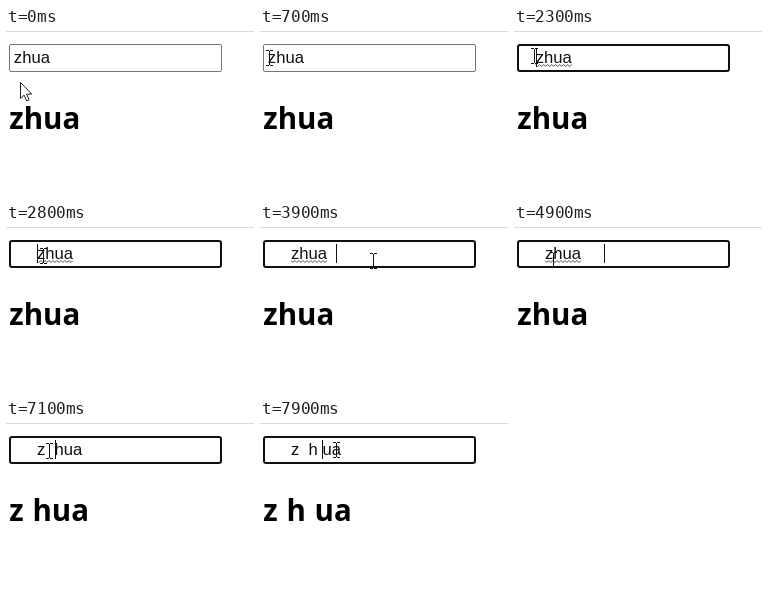
These frames come from a looping animation (248 by 168 pixels, 8 s). An HTML page with a canvas:

```html
<!DOCTYPE html>
<html lang="en">
<head>
<meta charset="utf-8">
<title>Text field</title>
<style>
  html, body { margin: 0; width: 100%; height: 100%; overflow: hidden; background: #fff; }
  canvas { display: block; width: 248px; height: 168px; }
</style>
</head>
<body>
<canvas id="stage"></canvas>
<script>
const W = 248, H = 168, LOOP = 8000, STEP = 100;
const WORD = 'zhua';
const FIELD_FONT = '16.67px "Liberation Sans", Arial, sans-serif';
const TITLE_FONT = '700 29.5px "Open Sans", "Noto Sans", sans-serif';
const TEXT_X = 7.8, BASE_Y = 35;
const FOCUS_AT = 900, MOVE = 500;

// each burst: click behind some letters, then type spaces at a steady pace
const bursts = [
  { click: FOCUS_AT, after: '', from: 1800, gap: 175, count: 5 },
  { click: 3500, after: WORD, from: 3700, gap: 200, count: 5 },
  { click: 6100, after: WORD[0], from: 6500, gap: 300, count: 2 },
  { click: 7300, after: WORD[1], from: 7900, gap: 0, count: 1 }
];

// places where the pointer comes to rest
const stops = [
  { at: 0, x: 14.5, y: 54.5 },
  { at: 700, x: 9, y: 30 },
  { at: 1500, x: 18, y: 28 },
  { at: 2700, x: 37, y: 32 },
  { at: 3400, x: 113, y: 37 },
  { at: 4900, x: 39, y: 36 },
  { at: 5900, x: 43, y: 31 },
  { at: 7700, x: 76, y: 30 }
];

const canvas = document.getElementById('stage');
const ctx = canvas.getContext('2d');
const dpr = window.devicePixelRatio || 1;
canvas.width = W * dpr;
canvas.height = H * dpr;

function fieldState(t) {
  let text = WORD, caret = 0, last = 0;
  for (const { click, after, from, gap, count } of bursts) {
    if (t < click) break;
    caret = text.indexOf(after) + after.length;
    last = click;
    for (let i = 0; i < count && t >= from + i * gap; i++) {
      text = text.slice(0, caret) + ' ' + text.slice(caret);
      caret++;
      last = from + i * gap;
    }
  }
  return { text, caret, focused: t >= FOCUS_AT, lit: (t - last) % 1000 < 500 };
}

function pointerAt(t) {
  let { x, y } = stops[0];
  for (const stop of stops.slice(1)) {
    const p = Math.min(1, Math.max(0, 1 - (stop.at - t) / MOVE));
    const e = p * p * (3 - 2 * p);
    x += (stop.x - x) * e;
    y += (stop.y - y) * e;
  }
  return { x, y };
}

function drawBox(focused) {
  const line = focused ? 2 : 1;
  ctx.beginPath();
  ctx.roundRect(3 + line / 2, 16 + line / 2, 213 - line, 28 - line, focused ? 2 : 1.5);
  ctx.strokeStyle = focused ? '#101010' : '#767676';
  ctx.lineWidth = line;
  ctx.stroke();
}

function drawWave(x, width) {
  ctx.beginPath();
  for (let d = 0; d <= width; d += 2) ctx.lineTo(x + d, d % 4 ? 38.5 : 36.5);
  ctx.strokeStyle = '#5e4a48';
  ctx.lineWidth = 1;
  ctx.stroke();
}

function drawField({ text, caret, focused, lit }) {
  drawBox(focused);
  ctx.font = FIELD_FONT;
  ctx.fillStyle = '#111';
  const offset = n => TEXT_X + ctx.measureText(text.slice(0, n)).width;
  ctx.fillText(text, TEXT_X, BASE_Y);
  const start = text.indexOf(WORD);
  if (focused && start >= 0) drawWave(offset(start), ctx.measureText(WORD).width);
  if (focused && lit) ctx.fillRect(Math.round(offset(caret)), 20, 1, 19);
}

function drawTitle(text) {
  ctx.font = TITLE_FONT;
  ctx.fillStyle = '#000';
  ctx.wordSpacing = '1.1px';
  ctx.fillText(text.trim().replace(/ +/g, ' '), 3.3, 101);
  ctx.wordSpacing = '0px';
}

function drawArrow(x, y) {
  ctx.save();
  ctx.translate(x, y);
  ctx.fillStyle = '#fff';
  ctx.strokeStyle = '#222';
  ctx.lineWidth = 1;
  const shape = new Path2D('M0 0V16L3.6 12.6 6.2 18.4 8.6 17.3 6.1 11.7 11.2 11.5Z');
  ctx.fill(shape);
  ctx.stroke(shape);
  ctx.restore();
}

function drawBeam(x, y) {
  x = Math.round(x);
  y = Math.round(y);
  ctx.fillStyle = '#111';
  ctx.fillRect(x, y - 7, 1, 14);
  for (const edge of [y - 8, y + 7]) {
    ctx.fillRect(x - 3, edge, 3, 1);
    ctx.fillRect(x + 1, edge, 3, 1);
  }
}

function draw(t) {
  ctx.setTransform(dpr, 0, 0, dpr, 0, 0);
  ctx.fillStyle = '#fff';
  ctx.fillRect(0, 0, W, H);
  ctx.fillStyle = '#dadada';
  ctx.fillRect(0, 3, W, 1);
  const state = fieldState(t);
  drawField(state);
  drawTitle(state.text);
  const { x, y } = pointerAt(t);
  (y > 44 ? drawArrow : drawBeam)(x, y);
}

const began = performance.now();
function tick() {
  const t = (performance.now() - began) % LOOP;
  // ten steps a second, like a screen recording
  draw(Math.floor((t + 10) / STEP) * STEP % LOOP);
  requestAnimationFrame(tick);
}
tick();
</script>
</body>
</html>
```
